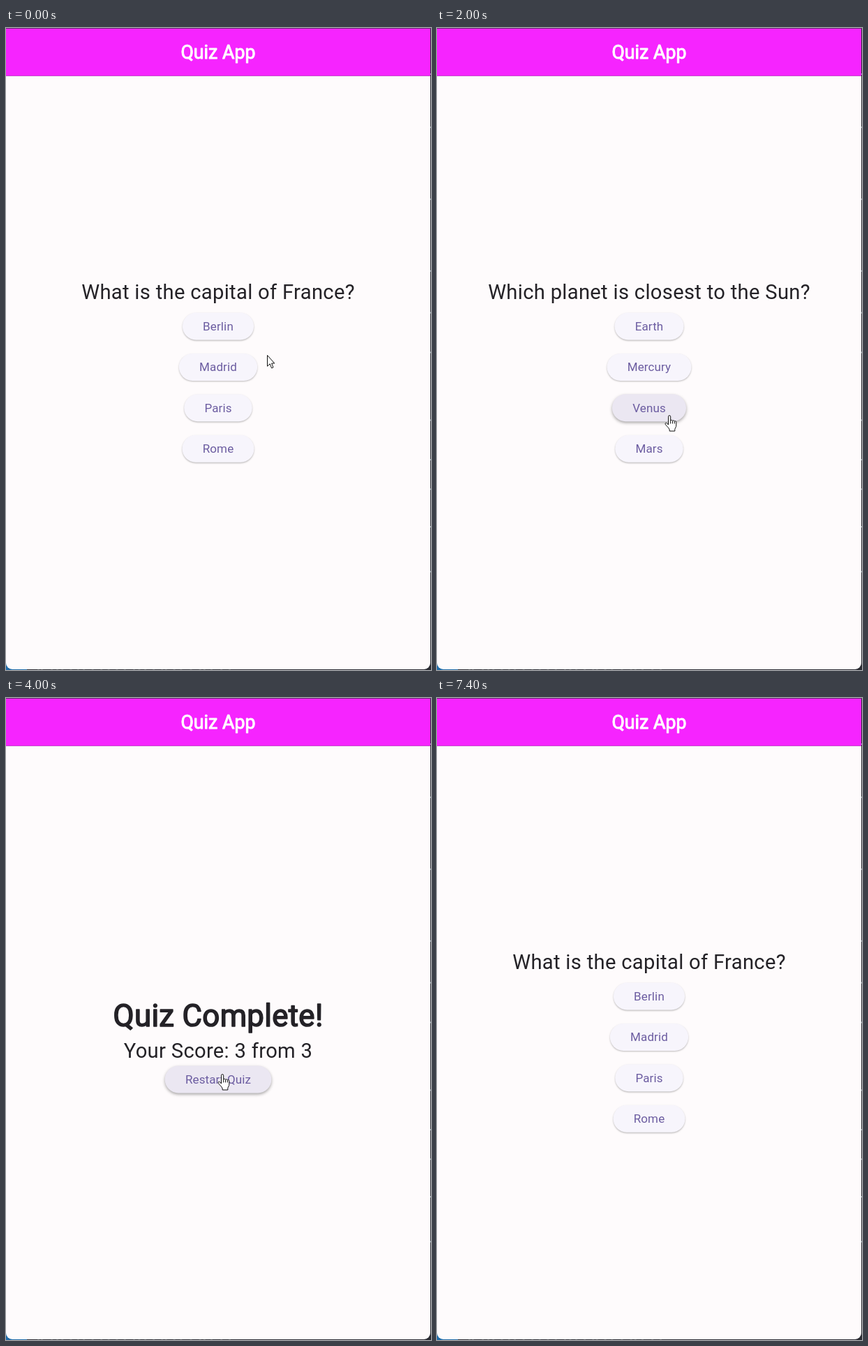
An HTML page with a canvas that plays this animation: 609x919 px, repeating every 7600 ms.

```html
<!DOCTYPE html>
<html lang="en">
<head>
<meta charset="utf-8">
<title>Quiz App</title>
<style>
  html, body { margin: 0; width: 100%; height: 100%; overflow: hidden; background: #fefbfc; }
  canvas { display: block; }
</style>
</head>
<body>
<canvas id="stage" width="609" height="919"></canvas>
<script>
const ctx = document.getElementById('stage').getContext('2d');
const W = 609, H = 919, MID = 304, LOOP = 7600, STEP = 200;
const UNIT = 1.217, SLOT = 48 * UNIT;
const INK = '#242227', LABEL = '#6c5da1';

// Each screen lasts until "end"; its picked button is pressed one step earlier.
const screens = [
  { end: 1600, pick: 2, top: 427, ask: 'What is the capital of France?',
    options: ['Berlin', 'Madrid', 'Paris', 'Rome'] },
  { end: 2800, pick: 1, top: 427, ask: 'Which planet is closest to the Sun?',
    options: ['Earth', 'Mercury', 'Venus', 'Mars'] },
  { end: 4000, pick: 2, top: 427, ask: 'Who wrote "Ordelm"?',
    options: ['Gervase Dolvick', 'T.B. Nurving', 'Everard Brackenston', 'Edna Orvand'] },
  { end: 6800, pick: 0, top: 546, options: ['Restart Quiz'] }
];

// The pointer glides along curves, each from where the last one ended.
const home = [374, 468];
const spot = i => [310, 422 + i * SLOT];
const glides = [
  { from: 0, until: 1200, bend: [458, 670], to: spot(2) },
  { from: 1600, until: 2400, bend: [356, 600], to: spot(1) },
  { from: 2800, until: 3400, bend: [336, 554], to: spot(2) },
  { from: 4000, until: 4400, bend: [340, 580], to: [359, 607] },
  { from: 5000, until: 5400, bend: [584, 650], to: [480, 940] },
  { from: 6000, until: 6600, bend: [400, 643], to: spot(2) },
  { from: 6800, until: 7000, bend: [320, 740], to: [330, 940] }
];

const arrow = new Path2D('M.5 .5V16.2L4.2 12.8L6.6 18.8L9 17.8L6.6 12H10.8Z');
const hand = new Path2D('M5.5 14V2.3a1.6 1.6 0 0 1 3.2 0V8.2a1.5 1.5 0 0 1 2.9 .4' +
  'a1.5 1.5 0 0 1 2.8 .7a1.3 1.3 0 0 1 2.4 .9V15c0 2.5-1.7 3.5-2 5.5V23H7.2V21' +
  'C6.5 18.5 3 16 1.2 13.2C.4 11.5 2.4 10.6 3.6 11.8Z');
const knuckles = new Path2D('M8.7 8.2V12.4M11.6 8.7V12.4M14.4 9.4V12.4');

const smooth = k => k * k * (3 - 2 * k);
const mix = (a, b, k) => `rgb(${a.map((v, i) => Math.round(v + (b[i] - v) * k))})`;
const screenAt = t => screens.find(s => t < s.end) || screens[0];
const buttonY = (screen, i) => screen.top + i * SLOT;

function randomizer(seed) {
  return () => (seed = seed * 16807 % 2147483647) / 2147483647;
}

function pointerAt(t) {
  let p = home;
  for (const { from, until, bend, to } of glides) {
    if (t < from) break;
    const k = smooth(Math.min(1, (t - from) / (until - from))), j = 1 - k;
    p = p.map((v, i) => j * j * v + 2 * j * k * bend[i] + k * k * to[i]);
  }
  return p;
}

function setFont(size, spacing) {
  ctx.font = `${size * UNIT}px Roboto, sans-serif`;
  ctx.letterSpacing = spacing * UNIT + 'px';
}

function buttonWidth(label) {
  setFont(14, .1);
  return ctx.measureText(label).width + 48 * UNIT;
}

function isOver(screen, i, t) {
  const [x, y] = pointerAt(t);
  return Math.abs(y - buttonY(screen, i)) < SLOT / 2 &&
    Math.abs(x - MID) < buttonWidth(screen.options[i]) / 2;
}

function rippleRadius(screen, i, t) {
  const pressed = screens.find(s => {
    const age = t - (s.end - STEP);
    return s.pick === i && s.top === screen.top && age > 0 && age <= 2 * STEP;
  });
  return pressed ? (t - pressed.end + STEP) * .13 : 0;
}

function rect(color, x, y, w, h) {
  ctx.fillStyle = color;
  ctx.fillRect(x, y, w, h);
}

function text(str, baseline, size, spacing, color, bold) {
  setFont(size, spacing);
  const x = MID - ctx.measureText(str).width / 2;
  ctx.fillStyle = ctx.strokeStyle = color;
  ctx.fillText(str, x, baseline);
  if (bold) {
    ctx.lineWidth = size * UNIT / 28;
    ctx.lineJoin = 'round';
    ctx.strokeText(str, x, baseline);
  }
}

function drawButton(label, y, glow, radius) {
  const w = buttonWidth(label), h = 32 * UNIT;
  const pill = new Path2D();
  pill.roundRect(MID - w / 2, y - h / 2, w, h, h / 2);
  ctx.save();
  ctx.shadowColor = `rgba(0,0,0,${.26 + .08 * glow})`;
  ctx.shadowBlur = 2.2 + 2 * glow;
  ctx.shadowOffsetY = 1.2 + .8 * glow;
  ctx.fillStyle = mix([247, 245, 252], [235, 231, 242], glow);
  ctx.fill(pill);
  ctx.restore();
  ctx.save();
  ctx.clip(pill);
  ctx.fillStyle = '#dcd7e8';
  ctx.beginPath();
  ctx.arc(MID - 2, y, radius, 0, 7);
  ctx.fill();
  ctx.restore();
  text(label, y + 6, 14, .1, LABEL);
}

function drawDesktop() {
  const random = randomizer(7);
  rect('#2b2c33', 0, 0, W, H);
  rect('#1f6ba8', 0, H - 10, 30, 10);
  for (let x = 45; x < 325; x += 5 + random() * 10) rect('#4b4c52', x, H - 1, 3, 1);
  for (let y = 65; y < 820; y += 30 + random() * 80) rect('#8d9ba2', W - 1, y, 1, 2);
}

function drawWindow() {
  ctx.fillStyle = '#fefbfc';
  ctx.beginPath();
  ctx.roundRect(0, 0, W - 1, H - 1, [0, 0, 9, 9]);
  ctx.fill();
  rect('#f624ff', 0, 1, W - 1, 67);
  rect('#652a6c', 0, 0, W, 1);
  rect('#c548cc', 0, 68, W - 1, 1);
  text('Quiz App', 44.3, 22, 0, '#fff', true);
}

function drawPage(screen, t) {
  if (screen.ask) {
    text(screen.ask, 388, 24, .25, INK);
  } else {
    text('Quiz Complete!', 470, 36, .25, INK, true);
    text('Your Score: 3 from 3', 515.3, 24, .25, INK);
  }
  screen.options.forEach((label, i) => {
    const glow = (isOver(screen, i, t) + isOver(screen, i, t - STEP)) / 2;
    drawButton(label, buttonY(screen, i), glow, rippleRadius(screen, i, t));
  });
}

function drawPointer(screen, t) {
  const isHand = screen.options.some((_, i) => isOver(screen, i, t));
  const shape = isHand ? hand : arrow;
  const [x, y] = pointerAt(t).map(Math.round);
  ctx.save();
  ctx.translate(isHand ? x - 7 : x, isHand ? y - 1 : y);
  ctx.fillStyle = '#fff';
  ctx.strokeStyle = '#111';
  ctx.lineWidth = 1;
  ctx.lineJoin = 'miter';
  ctx.fill(shape);
  ctx.stroke(shape);
  if (isHand) ctx.stroke(knuckles);
  ctx.restore();
}

function render(now) {
  const t = Math.floor(now % LOOP / STEP) * STEP;
  const screen = screenAt(t);
  drawDesktop();
  drawWindow();
  drawPage(screen, t);
  drawPointer(screen, t);
}

let start;
function tick(now) {
  start ??= now;
  render(now - start);
  requestAnimationFrame(tick);
}
requestAnimationFrame(tick);
</script>
</body>
</html>
```
